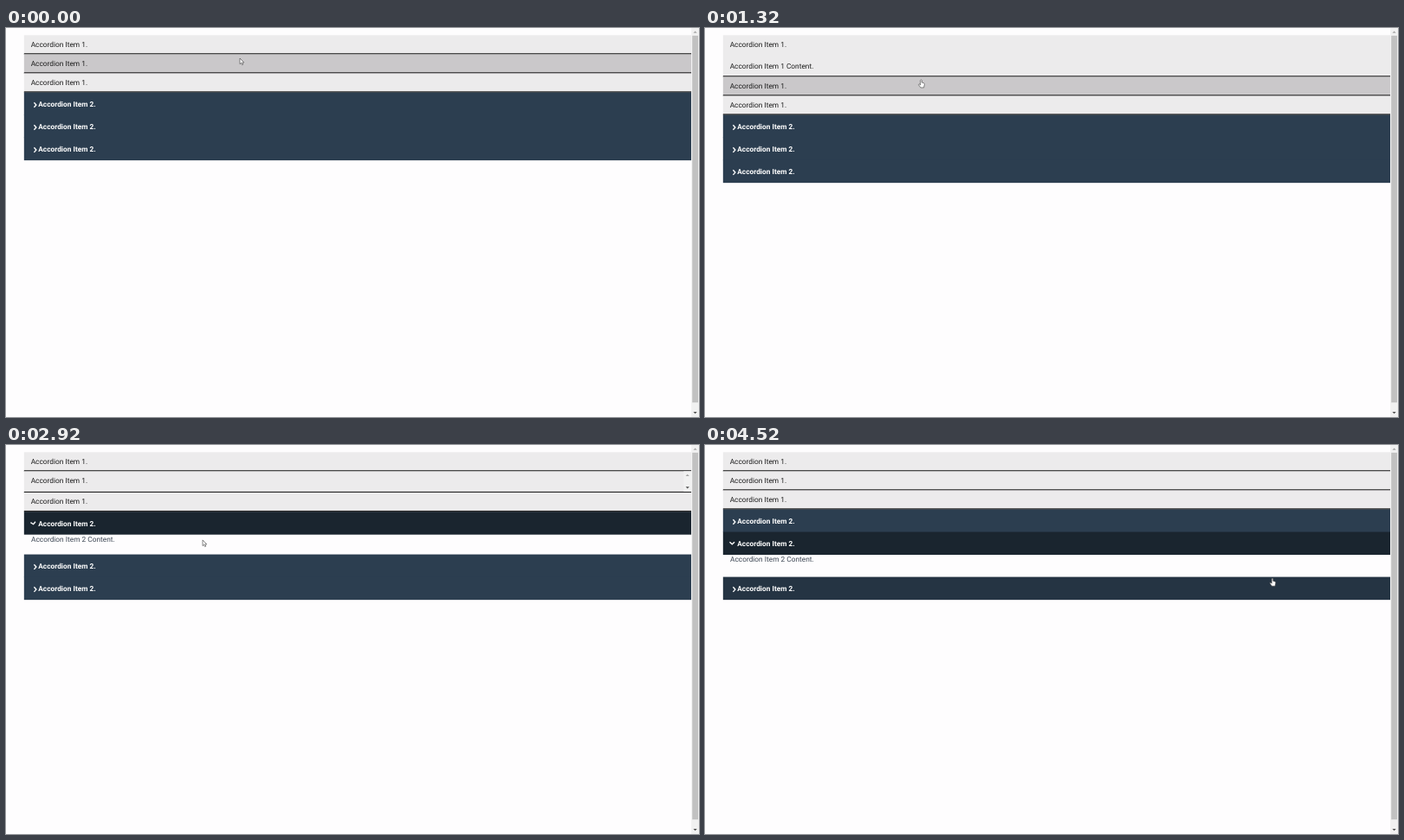
Animation of 800x450 px, one loop 4.56 s. Source, as an HTML page:

```html
<!DOCTYPE html>
<html lang="en">
<head>
<meta charset="utf-8">
<title>Accordion</title>
<style>
html, body { margin: 0; width: 100%; height: 100%; overflow: hidden; background: #fefdfe; }
svg { display: block; width: 800px; height: 450px; }
text { font: 8.333px Roboto, Arial, sans-serif; fill: #1c1c1c; text-rendering: geometricPrecision; }
.title { font-weight: 700; fill: #fff; }
.note { fill: #3c4653; }
.track { fill: #f1f1f1; }
.thumb { fill: #c1c1c1; }
.arrow { fill: #505050; }
.off { fill: #a6a6a6; }
.chevron { fill: none; stroke: #fff; stroke-width: 1.35; }
.cursor { fill: #fff; stroke: #3a3a3a; stroke-width: .6; stroke-linejoin: round; }
</style>
</head>
<body>
<svg id="stage" viewBox="0 0 800 450"></svg>
<script>
const LOOP = 4560, STEP = 40, FADE = 250;
const LEFT = 20.83, RIGHT = 791.15, TOP = 8.33;
const ROW = 22.05, RULE = 1.2, HEAD = 26.04, EXTRA = 26.04, BAR = 8.85;

const stage = document.getElementById('stage');

function add(parent, tag, attrs, label) {
  const el = document.createElementNS('http://www.w3.org/2000/svg', tag);
  set(el, attrs);
  if (label) el.textContent = label;
  parent.append(el);
  return el;
}

function set(el, attrs) {
  for (const k in attrs) el.setAttribute(k, attrs[k]);
}

function rect(parent, x, y, width, height, attrs) {
  return add(parent, 'rect', { x, y, width, height, ...attrs });
}

// CSS "ease": cubic-bezier(.25, .1, .25, 1)
function ease(x) {
  if (x <= 0) return 0;
  if (x >= 1) return 1;
  let lo = 0, hi = 1, u;
  for (let i = 0; i < 24; i++) {
    u = (lo + hi) / 2;
    const bx = .75 * u * (1 - u) + u * u * u;
    if (bx < x) lo = u; else hi = u;
  }
  return .3 * u * (1 - u) ** 2 + 3 * u * u * (1 - u) + u ** 3;
}

// Sum of [on, off] spans, each easing in and out
function level(spans, t) {
  return spans.reduce((sum, [on, off = Infinity]) =>
    sum + ease((t - on) / FADE) - ease((t - off) / FADE), 0);
}

function mix(a, b, p) {
  return `rgb(${a.map((v, i) => v + (b[i] - v) * p)})`;
}

const upArrow = 'M-2.1 1.1L0 -1.1L2.1 1.1Z';
const downArrow = 'M-2.1 -1.1L0 1.1L2.1 -1.1Z';

// First group: grey rows whose height grows
const rows = [
  { open: [[519, 1633]], hover: [[200, 1060]] },
  { open: [[1633, 2765]], hover: [[-500, 200], [1060, 2100]] },
  { open: [], hover: [[2100, 2250]] }
];
// Second group: navy heads with a panel below
const heads = [
  { open: [[2765, 3798]], hover: [[2250, 3798]] },
  { open: [[3798]], hover: [[3500]] },
  { open: [], hover: [[4460]] }
];

for (const r of rows) {
  r.g = add(stage, 'g', {});
  r.back = rect(r.g, LEFT, 0, RIGHT - LEFT, ROW);
  r.rule = rect(r.g, LEFT, 0, RIGHT - LEFT, RULE + .3, { fill: '#262626' });
  add(r.g, 'text', { x: 28.65, y: 13.4 }, 'Accordion Item 1.');
  if (r.open.length) add(r.g, 'text', { x: 28.65, y: 39.1 }, 'Accordion Item 1 Content.');
  r.bar = add(r.g, 'g', { transform: `translate(${RIGHT - BAR} 0)` });
  r.track = rect(r.bar, 0, 0, BAR, 1, { class: 'track' });
  r.thumb = rect(r.bar, 1.04, BAR, 6.8, 1, { class: 'thumb' });
  r.up = add(r.bar, 'path', { d: upArrow, class: 'off' });
  r.down = add(r.bar, 'path', { d: downArrow, class: 'arrow' });
}

for (const h of heads) {
  h.g = add(stage, 'g', {});
  if (h.open.length) add(h.g, 'text', { x: 29, y: 34.6, class: 'note' }, 'Accordion Item 2 Content.');
  h.back = rect(h.g, LEFT, 0, RIGHT - LEFT, HEAD + .5);
  h.mark = add(h.g, 'polyline', { points: '-.8,-.9 1.7,1.9 -.8,4.7', class: 'chevron' });
  add(h.g, 'text', { x: 37.2, y: 16.5, class: 'title' }, 'Accordion Item 2.');
}

// Page scrollbar
rect(stage, RIGHT, 0, BAR, 450, { class: 'track' });
rect(stage, 792.2, BAR, 6.8, 424.4, { class: 'thumb' });
add(stage, 'path', { d: upArrow, class: 'off', transform: 'translate(795.6 4.7)' });
add(stage, 'path', { d: downArrow, class: 'arrow', transform: 'translate(795.6 445.2)' });

const pointer = add(stage, 'path', { class: 'cursor',
  d: 'M0 0V6.7L1.5 5.3L2.6 7.7L3.7 7.2L2.7 4.9H4.7Z' });
const hand = add(stage, 'path', { class: 'cursor',
  d: 'M-.8 .7Q0 -.5 .8 .7V3.3L3 3.9Q4 4.3 3.8 5.6L3.1 9.2H-.6L-3 6Q-2.8 4.7 -1.8 5.3L-.8 6.2Z' });

// Cursor stops: time, x, y
const path = [
  [0, 270, 35], [120, 270, 34], [300, 273, 23], [680, 273, 22], [900, 272, 24],
  [1160, 251, 59], [1400, 249, 60], [1840, 248.5, 59], [1940, 247.5, 61],
  [2400, 229, 109], [2760, 228.5, 109.5], [3120, 225, 110.5], [3380, 225, 111],
  [3620, 207, 140], [3920, 206, 141], [4080, 215, 142], [4470, 655, 154]
];
const arrowSpans = [[0, 80], [2860, 3500], [3870, 4450]];

function cursorAt(t) {
  const i = path.findIndex(p => p[0] > t);
  if (i < 0) return path[path.length - 1].slice(1);
  const a = path[i - 1], b = path[i];
  const u = (t - a[0]) / (b[0] - a[0]), s = u * u * (3 - 2 * u);
  return [a[1] + (b[1] - a[1]) * s, a[2] + (b[2] - a[2]) * s];
}

function drawBar(r, p, h) {
  const shown = p > .03 && p < .999;
  r.bar.style.display = shown ? '' : 'none';
  if (!shown) return;
  const btn = Math.min(BAR, h / 2), room = h - 2 * btn;
  set(r.track, { height: h });
  set(r.thumb, { height: room > BAR ? room * Math.min(1, h / (ROW - RULE + EXTRA)) : 0 });
  set(r.up, { transform: `translate(4.4 ${btn / 2})` });
  set(r.down, { transform: `translate(4.4 ${h - btn / 2})` });
}

function draw(t) {
  let y = TOP;
  for (const r of rows) {
    const p = level(r.open, t), h = ROW + EXTRA * p;
    set(r.g, { transform: `translate(0 ${y})` });
    set(r.back, { height: h, fill: mix([236, 235, 236], [202, 200, 202], level(r.hover, t)) });
    set(r.rule, { y: h - RULE });
    drawBar(r, p, h - RULE);
    y += h;
  }
  for (const h of heads) {
    const p = level(h.open, t);
    set(h.g, { transform: `translate(0 ${y})` });
    set(h.back, { fill: mix([44, 62, 80], [26, 37, 47], level(h.hover, t)) });
    set(h.mark, { transform: `translate(33.2 12.6) rotate(${90 * p})` });
    y += HEAD + EXTRA * p;
  }
  const plain = arrowSpans.some(([a, b]) => t >= a && t < b);
  const place = { transform: `translate(${cursorAt(t).join(' ')})` };
  set(pointer, place);
  set(hand, place);
  pointer.style.display = plain ? '' : 'none';
  hand.style.display = plain ? 'none' : '';
}

let start;
function tick(now) {
  if (start === undefined) start = now;
  draw(Math.floor((now - start) % LOOP / STEP) * STEP);
  requestAnimationFrame(tick);
}
draw(0);
requestAnimationFrame(tick);
</script>
</body>
</html>
```
